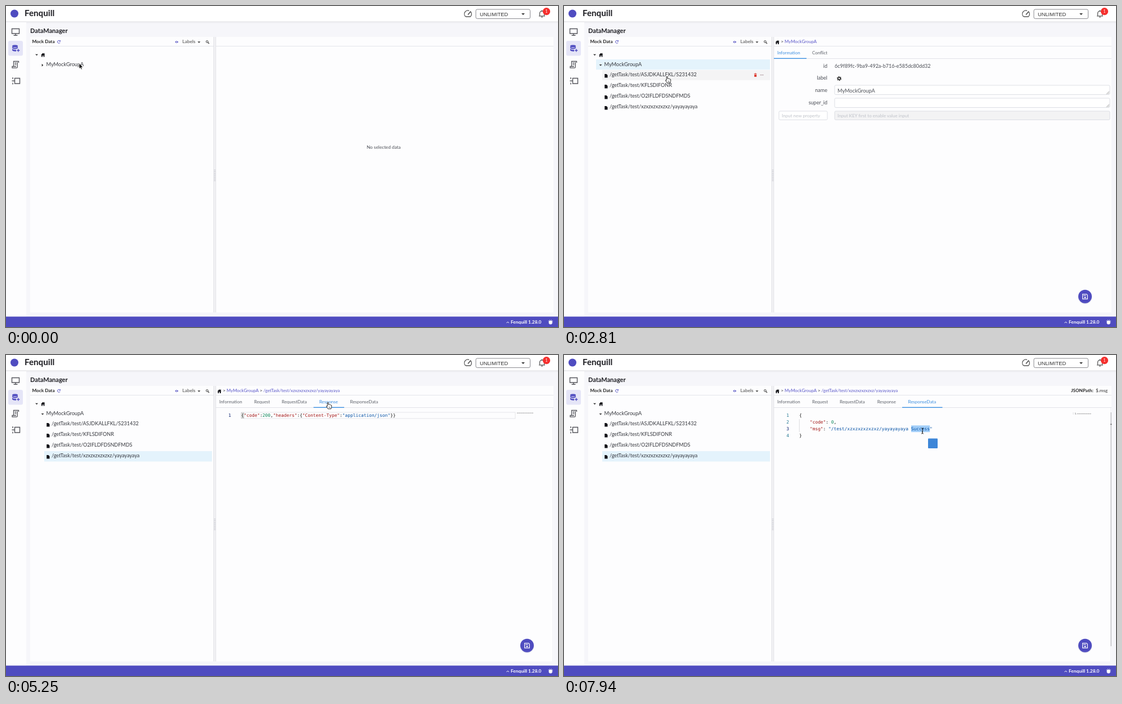
Write an HTML page that moves like this. It is 981 by 571 pixels and loops after 8000 ms.

```html
<!DOCTYPE html>
<html lang="en">
<head>
<meta charset="utf-8">
<title>Data manager</title>
<style>
html, body { margin: 0; width: 100%; height: 100%; overflow: hidden; background: #f6f6fa; }
svg { display: block; width: 981px; height: 571px; }
text { font-family: Lato, sans-serif; fill: #34363c; white-space: pre; }
.sans { font-family: "Liberation Sans", sans-serif; }
.cjk { font-family: "Noto Sans CJK SC", "Noto Sans CJK", sans-serif; }
.code, .code text { font-family: "DejaVu Sans Mono", monospace; font-size: 7.87px; fill: #111; }
.key { fill: #a31515; }
.val { fill: #0451a5; }
.num { fill: #098658; }
</style>
</head>
<body>
<svg id="stage" viewBox="0 0 981 571" xmlns="http://www.w3.org/2000/svg"></svg>
<script>
const LOOP = 8000;
const BRAND = 'Fenquill', INDIGO = '#4f4cc0', BLUE = '#3a8ee0', GREY = '#5c6068';
const CODE_X = 418, CODE_Y = 110.2, CHAR = 7.87 * 0.602, LINE = 11.8;
const PATH = '/getTask/test/xzxzxzxzxzxz/yayayayaya';

// Moments at which the screen changes
const EXPAND = 2060, PICK = 2360, DETAILS = 2450, OPEN = 3630, LOADED = 4060,
      RESPONSE = 4900, RESPONSE_IN = 5060, DATA = 5850, DATA_IN = 6060,
      TOKENS = 6200, SELECT = 7300, POPUP = 7750;

const text = (x, y, s, size, fill = '#34363c', more = '') =>
  `<text x="${x}" y="${y}" font-size="${size}" style="fill:${fill}" ${more}>${s}</text>`;
const rect = (x, y, w, h, fill, more = '') =>
  `<rect x="${x}" y="${y}" width="${w}" height="${h}" fill="${fill}" ${more}/>`;
const path = (d, fill, more = '') => `<path d="${d}" fill="${fill}" ${more}/>`;
const line = (d, color, width = 1, more = '') =>
  path(d, 'none', `stroke="${color}" stroke-width="${width}" ${more}`);
const at = (x, y, body) => `<g transform="translate(${x} ${y})">${body}</g>`;
const during = (from, to, ...body) => `<g data-from="${from}" data-to="${to}">${body.join('')}</g>`;
const BOLD = 'font-weight="700"', END = 'text-anchor="end"';

const house = (x, y) => at(x, y, path('M-3.5 0L0 -3.5 1.8 -1.7V-3.2H2.8V-.7L3.5 0H2.7V3.4H.8V1H-.8V3.4H-2.7V0Z', '#15151a'));
const down = (x, y, w = 2.5) => path(`M${x - w} ${y - w / 2}H${x + w}L${x} ${y + w / 2}Z`, '#333');
const sheet = (x, y) => path(`M${x - 2.6} ${y - 3}H${x + .6}L${x + 2.7} ${y - .9}V${y + 3.6}H${x - 2.6}Z`, '#15151a');
const rowY = i => 104 + 19 * i;

function header() {
  return rect(0, 0, 981, 28, '#fff') + rect(0, 27.5, 981, 1, '#d9d9dd') + rect(0, 28.5, 981, 2, '#efeff3') +
    `<circle cx="15" cy="13.5" r="7" fill="${INDIGO}"/>` +
    text(33, 18, BRAND, 15.2, '#1d1d22', BOLD) +
    line('M817 19A6.2 6.2 0 0 1 823 8.3M826 10.5A6.2 6.2 0 0 1 825.3 19H817', '#555', 1.3) +
    line('M821 15.5L826 9.5', '#555', 1.8) +
    rect(835, 6, 96.5, 16.5, '#fff', 'rx="2.5" stroke="#8b8b90"') +
    text(842, 17.8, 'UNLIMITED', 9.3, '#333', 'class="sans"') +
    down(919, 14.5, 3) +
    line('M947 17.8H958M948.5 17V13A4 4 0 0 1 956.5 13V17M952.5 9V7.5', '#555', 1.3) +
    path('M951 19H954A1.5 1.5 0 0 1 951 19Z', '#555') +
    '<circle cx="960.5" cy="9.7" r="6.6" fill="#f5302e"/>' +
    text(960.5, 12.1, '1', 7, '#fff', 'text-anchor="middle"');
}

function sidebar() {
  const c = '#55565c';
  return rect(0, 29, 36, 524, '#fdfdfe') + rect(4, 62, 26, 26.5, '#e5e5f7', 'rx="3"') +
    line('M10.5 40.5H23.5V49H10.5ZM17 49V52M13.5 52.3H20.5', c, 1.4) +
    at(16, 75, `<ellipse cx="0" cy="-3.6" rx="5" ry="2.2" fill="${INDIGO}"/>` +
      path('M-5 -2.2Q0 1.5 5 -2.2V0Q0 3.4 -5 0ZM-5 1.3Q-2 3.6 2 2.8V5.7Q-3 6.2 -5 4Z', INDIGO) +
      line('M3.3 4H8.3M5.8 1.5V6.5', INDIGO, 1.4)) +
    line('M13.5 107V98.5H22.5V101M20.3 100V108.5Q20.3 110.2 18.5 110.2H11V107.5H18M15.5 101.5H18.5M15.5 104.2H18.5', c, 1.3) +
    line('M15.5 128.5H24.5V138H15.5ZM10.5 133.2H15.5M12 127V130M12 136.5V139.5', c, 1.4);
}

function frame() {
  let dots = '';
  for (let y = 291.5; y < 311; y += 2.7) dots += rect(369.5, y, 3, .8, '#b9bbc2');
  return text(43, 48, 'DataManager', 11, '#1d1d22', BOLD) +
    rect(43, 55, 930, 490, '#fdfdfe') +
    line('M43 71.5H369M373 71.5H973', '#e4e5ea') +
    rect(369, 55, 4, 490, '#f5f5f7') + line('M369.3 55V545M372.7 55V545', '#d6d7dd', .8) + dots +
    text(46.5, 66, 'Mock Data', 8.2, '#222', BOLD) +
    line('M96 62.3A2.5 2.5 0 1 0 96.2 65M96.4 61V63H94.4', INDIGO, .9) +
    path('M300.3 64Q303.3 60.5 306.3 64 303.3 67.5 300.3 64Z', INDIGO) + '<circle cx="303.3" cy="64" r=".9" fill="#fff"/>' +
    text(313.5, 66, 'Labels', 8.4, '#444') + down(343, 64.5) +
    line('M358.7 64.7L361 67', '#333', 1.2) + '<circle cx="357.4" cy="63.4" r="1.8" fill="none" stroke="#333"/>' +
    rect(0, 552.5, 981, 18.5, INDIGO) +
    line('M889.5 564L891.7 561.8 893.9 564', '#fff', 1) +
    text(897, 565, BRAND + ' 1.28.0', 8.3, '#fff', BOLD) +
    path('M965 561H970.5V564Q970.5 566.3 967.8 566.3 965 566.3 965 564Z', '#fff') +
    line('M963.8 560.5H971.8M964 563.5H971.5M966 558.2L967 559.7M969.5 558.2L968.5 559.7', '#fff', 1);
}

function tree() {
  const files = ['ASJDKALLFKL/S231432', 'KFLSDIFONR', 'O2IFLDFDSNDFMDS', 'xzxzxzxzxzxz/yayayayaya'];
  const tools = path('M337.8 -2.4H342.6V-1.6H337.8ZM338.2 -1H342.2V3.2H338.2ZM339.3 -3.2H341.1V-2.4H339.3Z', '#dc3a30') +
    [349.4, 351.6, 353.8].map(x => `<circle cx="${x}" cy="0" r=".65" fill="#86606a"/>`).join('');
  return rect(57, 95, 309, 18, '#f4f4f5', 'id="hover"') +
    during(PICK, OPEN, rect(57, 95, 309, 18.3, '#e4f3fc')) +
    during(OPEN, LOOP, rect(68, 171, 298, 18.5, '#e4f3fc')) +
    `<g id="tools">${tools}</g>` +
    down(54.5, 87) + house(65.7, 87) +
    text(71.5, 107.2, 'MyMockGroupA', 9.17) +
    during(0, EXPAND, path('M63.7 102.8L66.2 105.3 63.7 107.8Z', '#222')) +
    during(EXPAND, LOOP, down(65, 105.3),
      ...files.map((f, i) => sheet(74.8, rowY(i + 1) + 1) +
        text(81, rowY(i + 1) + 2.4, '/getTask/test/' + f, 9.04)));
}

const crumbs = tail => house(379.2, 64.5) +
  `<text x="385.5" y="66" font-size="7.85">&gt; <tspan fill="#5a57c8">MyMockGroupA</tspan>${tail}</text>`;

function details() {
  const field = (y, name) => text(468, y, name, 9, '#4a4d55', END);
  const box = (x, y, w, h, fill = '#fff') => rect(x, y, w, h, fill, 'rx="2" stroke="#dadce2" stroke-width=".9"');
  const grip = y => line(`M964 ${y}L969 ${y - 5}M966.5 ${y}L969 ${y - 2.5}`, '#777', .7);
  return crumbs('') + line('M373 93.5H973', '#dcdee2', .8) +
    text(379, 86, 'Information', 7.9, BLUE) + text(441, 86, 'Conflict', 7.9, GREY) + rect(373, 92.6, 58, 1.4, BLUE) +
    field(110, 'id') + field(131, 'label') + field(152.5, 'name') + field(175, 'super_id') +
    text(481, 110, '6c9f89fc-9ba9-492a-b716-e585dc80dd32', 9, '#4a4d55') +
    '<circle cx="489" cy="129" r="2.2" fill="none" stroke="#333" stroke-width="1.7"/>' +
    '<circle cx="489" cy="129" r="3.5" fill="none" stroke="#333" stroke-width="1.2" stroke-dasharray="1.8 1.86"/>' +
    box(481, 141, 489, 16.5) + text(486, 154, 'MyMockGroupA', 9.17, '#4a4d55') + grip(156.8) +
    box(481, 164, 489, 16.5) + grip(179.8) +
    box(382, 187, 86, 15.5) + text(387, 197.6, 'Input new property', 8.05, '#bfc2c9') +
    box(481, 187, 489, 15.5, '#f3f3f4') + text(486, 197.6, 'Input KEY first to enable value input', 8.05, '#bfc2c9');
}

const codeLine = (n, col, body) => `<text x="${CODE_X + col * CHAR}" y="${CODE_Y + (n - 1) * LINE}">${body}</text>`;
const span = (cls, s) => `<tspan class="${cls}">${s}</tspan>`;
const key = s => span('key', `"${s}"`) + ':';
const val = s => span('val', `"${s}"`);
const numbers = (count, active) => Array.from({ length: count }, (_, i) =>
  `<text x="400" y="${CODE_Y + i * LINE}" ${END} style="fill:${i + 1 === active ? '#0b216f' : '#237893'}">${i + 1}</text>`).join('');
const lineBox = rect(418, 102, 487, 11, 'none', 'stroke="#e3e3e6" stroke-width=".9"');
const bracket = rect(418.3, 102.8, 4.5, 9.8, '#eceeec', 'stroke="#b9b9b9" stroke-width=".7"');

function editor() {
  const tabs = [[379, 'Information'], [441, 'Request'], [490, 'RequestData'], [556.7, 'Response'], [611.5, 'ResponseData']];
  const info = '{' + key('id') + val('badffcb7-768c-43bd-972a-79fe617c96a9') + ',' + key('name') + val(PATH) + ',' + key('rule') + '{' + span('key', '"re');
  const msg = '/test/xzxzxzxzxzxz/yayayayaya Success';
  const tiny = line('M908 103.2H909.5M908 105H911M912 104.6H937', '#444', .9, 'stroke-dasharray="2.2 .5" opacity=".6"');
  const data = colored => codeLine(1, 0, '{') + codeLine(4, 0, '}') +
    (colored
      ? codeLine(2, 4, key('code') + ' ' + span('num', '0') + ',') + codeLine(3, 4, key('msg') + ' ' + val(msg))
      : codeLine(2, 4, '"code": 0,') + codeLine(3, 4, `"msg": "${msg}"`));
  return crumbs(` &gt; <tspan fill="#5a57c8">${PATH}</tspan>`) + line('M373 93.5H973', '#dcdee2', .8) +
    tabs.map(([x, s], i) => text(x, 86, s, 7.9, GREY, `data-tab="${i}"`)).join('') +
    rect(373, 92.6, 58, 1.4, BLUE, 'id="ink"') + line('M971.7 94V545', '#ececf0', .8) +
    '<g class="code">' +
    during(OPEN, DATA_IN, lineBox, numbers(1, 1)) +
    during(LOADED, RESPONSE_IN, bracket, codeLine(1, 0, info),
      line('M904.5 102V545', '#e2e2e5', 1),
      line('M906 102.4H971', '#0451a5', 1.2, 'stroke-dasharray="7 .6 3 .5" opacity=".55"'),
      line('M933 104H962', '#a31515', .7, 'stroke-dasharray="4 5" opacity=".5"'),
      rect(971.5, 102, 1.8, 11.5, '#77777c')) +
    during(RESPONSE_IN, DATA_IN, bracket,
      codeLine(1, 0, '{' + key('code') + span('num', '200') + ',' + key('headers') + '{' + key('Content-Type') + val('application/json') + '}}'),
      line('M908 103.2H937', '#444', .9, 'stroke-dasharray="2.2 .5" opacity=".6"')) +
    during(DATA_IN, LOOP, line('M418.3 114V137', '#d3d3d6', .8), tiny, rect(971.5, 102, 1.5, 416, '#c4c4c8')) +
    during(DATA_IN, SELECT, lineBox, numbers(4, 1), rect(971.3, 101.5, 2, 1.6, '#555')) +
    during(SELECT, LOOP, rect(617, 125.3, 33.2, 11.8, '#a3cff9'), numbers(4, 3), rect(971.3, 122.5, 2, 1.6, '#555'),
      rect(904.5, 102, 1, 4, '#dddde0')) +
    during(DATA_IN, TOKENS, data(false)) + during(TOKENS, LOOP, data(true)) +
    rect(0, 0, 1.3, 11.5, '#000', 'id="caret"') + '</g>' +
    during(SELECT, LOOP, text(901, 66, 'JSONPath:', 8.2, '#222', BOLD), text(945, 66, '$.msg', 8.2, '#333')) +
    during(POPUP, LOOP, rect(647, 148.5, 17, 17.5, '#3d86d8', 'rx="1"'));
}

const saveButton = '<circle cx="926" cy="517.6" r="12.6" fill="#e4e4ec"/>' +
  `<circle cx="926" cy="516.8" r="12" fill="${INDIGO}"/>` +
  line('M921.7 512.5H928.6L930.3 514.2V521.1H921.7ZM923.3 514.6H927.6', '#fff', 1.2) + '<circle cx="926" cy="518.4" r="1.4" fill="#fff"/>';

const status = rect(0, 557.5, 325, 13.5, '#dfe0e2', 'stroke="#c2c3c7" stroke-width=".7"') +
  text(2, 567.4, '正在等待 pilothill 的响应...', 8.2, '#111', 'class="cjk" font-weight="500"');

const pointers = {
  arrow: path('M0 0V9.6L2.2 7.6 3.7 11 5.3 10.3 3.8 7.1H6.8Z', '#000', 'stroke="#fff" stroke-width=".7"'),
  hand: path('M-1.8 1Q-1 -.6 0 .8V4.2L1.4 4 2.6 4.5 3.8 4.7 5.6 5.6V8.5L4.6 11.8H-.8L-3.6 7.4Q-3.8 6 -1.8 7.2Z', '#fff', 'stroke="#111" stroke-width=".9"') +
    line('M1 8V10M2.7 8V10', '#111', .6),
  beam: line('M-1.8 -5Q0 -5 0 -3.8Q0 -5 1.8 -5M0 -4V4M-1.8 5Q0 5 0 3.8Q0 5 1.8 5M-1 1.6H1', '#111', 1)
};

const stage = document.getElementById('stage');
stage.innerHTML = rect(0, 0, 981, 571, '#f6f6fa') + header() + sidebar() + frame() + tree() +
  during(0, DETAILS, text(641, 253.5, 'No selected data', 8.2, '#4a4d55')) +
  during(DETAILS, OPEN, details()) + during(OPEN, LOOP, editor()) + during(DETAILS, LOOP, saveButton) +
  during(PICK, 2600, status) + during(3690, LOADED, status) +
  '<g id="pointer">' + Object.entries(pointers).map(([k, v]) => `<g data-kind="${k}">${v}</g>`).join('') + '</g>';

// Pointer stops: time, x, y
const moves = [[0, 130, 102], [60, 130, 102], [810, 74, 104], [1000, 74, 104], [1440, 68, 104], [2060, 68, 104],
  [2280, 108, 102], [2480, 108, 102], [2780, 184, 125], [2900, 184, 125], [3500, 189, 178], [3950, 189, 178],
  [4370, 618, 112], [4460, 618, 112], [4820, 573, 84], [5500, 573, 84], [5800, 633, 85.4], [6240, 633, 85.4],
  [6780, 637, 132], [7400, 637, 132], [7600, 637, 135], [LOOP, 637, 135]];
// Underline stops: time, x, width
const inks = [[0, 373, 58], [RESPONSE, 373, 58], [RESPONSE + 260, 546.5, 54.5], [DATA, 546.5, 54.5], [DATA + 260, 601, 71.5], [LOOP, 601, 71.5]];

function track(stops, t) {
  const i = stops.findIndex(s => s[0] > t);
  const [a, b] = [stops[i - 1], stops[i]];
  const p = (t - a[0]) / (b[0] - a[0]), e = p * p * (3 - 2 * p);
  return [a[1] + (b[1] - a[1]) * e, a[2] + (b[2] - a[2]) * e];
}

const $ = id => document.getElementById(id);
const show = (el, on) => { el.style.display = on ? '' : 'none'; };
const timed = [...stage.querySelectorAll('[data-from]')];
const kinds = [...stage.querySelectorAll('[data-kind]')];
const tabEls = [...stage.querySelectorAll('[data-tab]')];

function draw(t) {
  timed.forEach(el => show(el, t >= +el.dataset.from && t < +el.dataset.to));

  const [x, y] = track(moves, t);
  $('pointer').setAttribute('transform', `translate(${x} ${y})`);
  const kind = t < 2150 ? 'arrow' : x < 369 || y < 94 ? 'hand' : y > 100 && t > LOADED ? 'beam' : 'arrow';
  kinds.forEach(el => show(el, el.dataset.kind === kind));

  const row = Math.round((y - 104) / 19);
  const over = t >= 1690 && x < 366 && row >= 0 && row <= 4;
  show($('hover'), over && !(row === 0 && t >= PICK) && !(row === 4 && t >= OPEN));
  show($('tools'), over);
  if (over) {
    const left = row ? 68 : 57;
    $('hover').setAttribute('x', left);
    $('hover').setAttribute('width', 366 - left);
    $('hover').setAttribute('y', rowY(row) - 9);
    $('tools').setAttribute('transform', `translate(0 ${rowY(row) - .3})`);
  }

  const [inkX, inkW] = track(inks, t);
  $('ink').setAttribute('x', inkX);
  $('ink').setAttribute('width', inkW);
  const active = t < RESPONSE ? 0 : t < DATA ? 3 : 4;
  tabEls.forEach((el, i) => {
    const fading = i === 3 && t >= DATA && t < 6170;
    el.style.fill = i === active ? BLUE : fading ? '#5b9de2' : GREY;
  });

  const since = t - (t < SELECT ? DATA_IN : SELECT + 100);
  show($('caret'), t >= DATA_IN && Math.floor(since / 500) % 2 === 0);
  $('caret').setAttribute('x', t < SELECT ? 417.6 : 649.5);
  $('caret').setAttribute('y', t < SELECT ? 101.8 : 125.3);
}

const start = performance.now();
function tick() {
  draw((performance.now() - start) % LOOP);
  requestAnimationFrame(tick);
}
tick();
</script>
</body>
</html>
```
